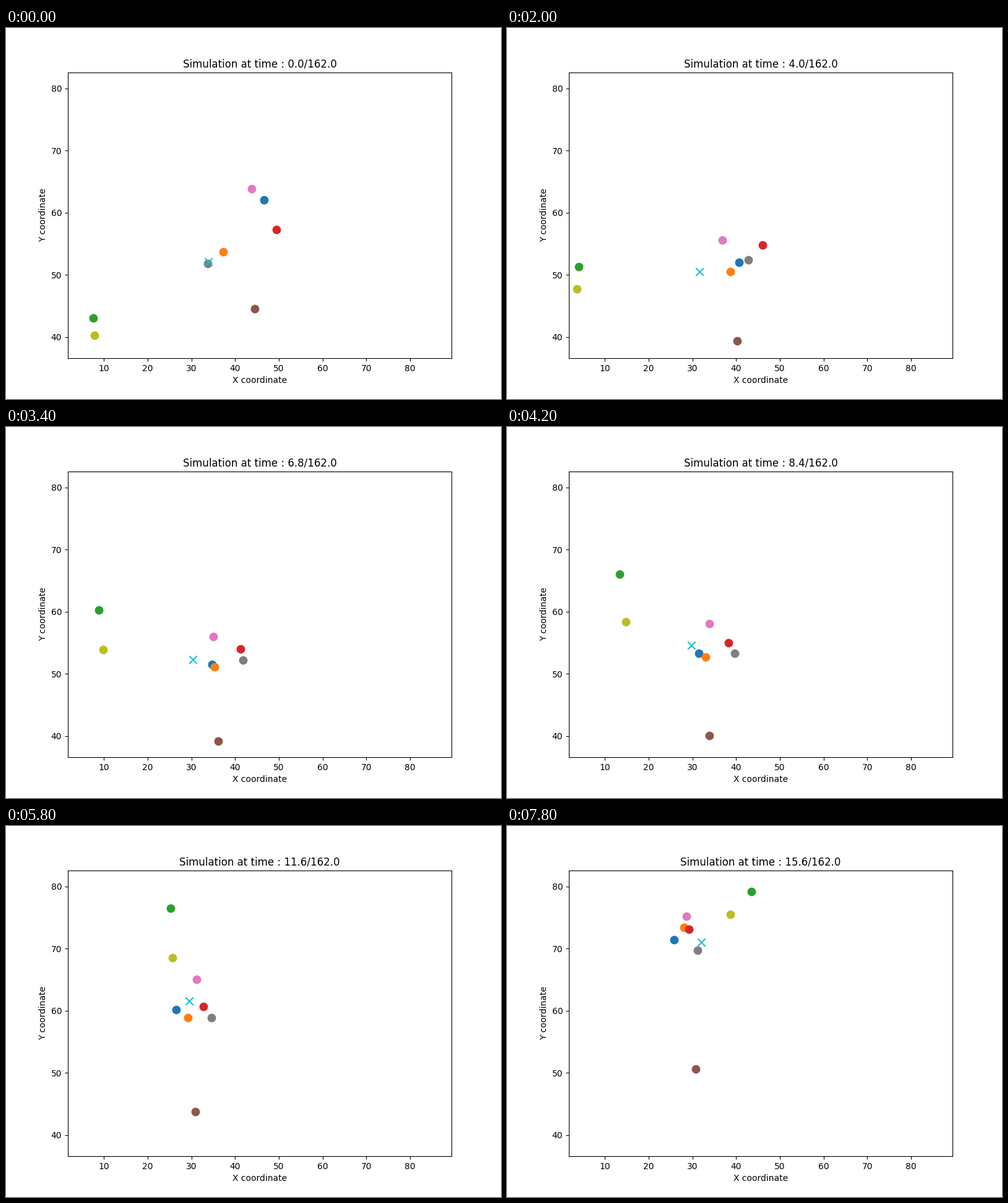
Animation, 800 px wide and 600 px high, one loop 8000 ms. Source, as a matplotlib script:

```python
import numpy as np
import matplotlib.pyplot as plt
from matplotlib.animation import FuncAnimation

FRAMES = 40
STEP = 0.4          # simulated time per frame
TOTAL = 162.0
HEIGHT = 600

# Each body glides along a smooth quartic through five stage points (y down),
# which it passes at these frame numbers.
KEYS = np.array([0, 6, 20, 33, 39])
PATHS = {
    "C0": [(417, 278), (396, 352), (316, 372), (267, 252), (270, 184)],
    "C1": [(351, 362), (366, 387), (325, 377), (287, 262), (286, 164)],
    "C2": [(141, 469), (114, 426), (173, 253), (315, 101), (395, 106)],
    "C3": [(437, 326), (427, 339), (363, 353), (305, 247), (294, 167)],
    "C5": [(402, 454), (387, 493), (331, 502), (302, 437), (305, 393)],
    "C6": [(397, 260), (361, 323), (329, 324), (298, 206), (290, 146)],
    "C7": [(326, 381), (377, 370), (372, 370), (317, 268), (308, 201)],
    "C8": [(143, 497), (107, 450), (183, 327), (306, 170), (361, 143)],
}


def glide(points):
    powers = lambda t: np.vander(t / FRAMES, len(KEYS))
    return powers(np.arange(FRAMES)) @ np.linalg.solve(powers(KEYS), points)


fig, ax = plt.subplots(figsize=(8, HEIGHT / 100), dpi=100)
ax.set_xlim(1.74, 89.48)
ax.set_ylim(36.58, 82.57)
ax.set_xlabel("X coordinate")
ax.set_ylabel("Y coordinate")
title = ax.set_title("")


def to_data(track):
    flipped = track * [1, -1] + [0, HEIGHT]
    return ax.transData.inverted().transform(flipped)


tracks = [to_data(glide(points)) for points in PATHS.values()]
tracks.append(np.mean(tracks, axis=0))    # centre of the group

dots = [ax.scatter([], [], s=80, color=c) for c in PATHS]
dots.append(ax.scatter([], [], s=80, color="C9", marker="x"))


def draw(i):
    for dot, track in zip(dots, tracks):
        dot.set_offsets(track[i])
    title.set_text(f"Simulation at time : {i * STEP:.1f}/{TOTAL}")
    return [*dots, title]


anim = FuncAnimation(fig, draw, frames=FRAMES, interval=200,
                     repeat=True, repeat_delay=0)
plt.show()
```
